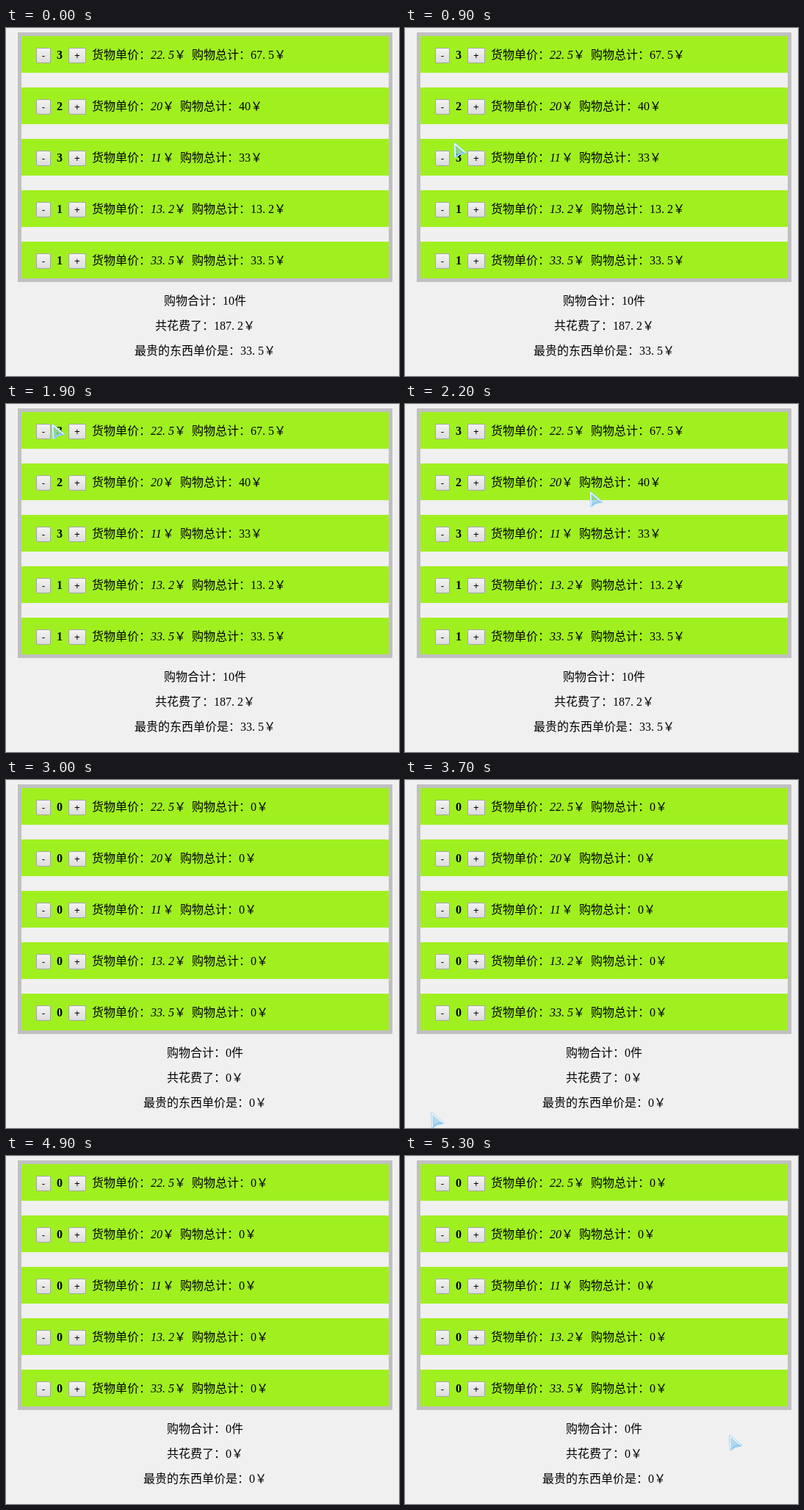
An HTML page for the animation above (8400 ms loop, 535x474 px).

```html
<!DOCTYPE html>
<html lang="zh-CN">
<head>
<meta charset="UTF-8">
<title>购物清单</title>
<style>
  html, body { margin: 0; width: 100%; height: 100%; overflow: hidden; background: #f0f0f0; }
  svg { display: block; }
  text { white-space: pre; }
  .shop { font: 300 16px "Liberation Serif", "Noto Sans CJK SC", "Noto Sans CJK", serif; }
  .dot { letter-spacing: 4px; }
  .price { font-style: italic; }
  .count { font-weight: bold; }
  .key { font: 13.33px "Liberation Sans", sans-serif; }
  .tab { font: 12px "Open Sans", sans-serif; }
  .code { font: 13.3px "DejaVu Sans Mono", "Noto Sans CJK SC", "Noto Sans CJK", monospace; fill: #fff; }
  .han { font: 15px "Noto Sans CJK SC", "Noto Sans CJK", sans-serif; }
  .p { fill: #f92672; }
  .g { fill: #a6e22e; }
  .y { fill: #e6db74; }
  .o { fill: #fd971f; }
  .c { fill: #66d9ef; }
  .i { fill: #66d9ef; font-style: italic; }
  .v { fill: #ae81ff; }
</style>
</head>
<body>
<svg id="stage" width="535" height="474" viewBox="0 0 535 474">
  <defs>
    <linearGradient id="face" x2="0" y2="1">
      <stop offset="0" stop-color="#f3f3f3"/>
      <stop offset="1" stop-color="#dcdcdc"/>
    </linearGradient>
    <linearGradient id="glass" x2="1" y2="1">
      <stop offset="0" stop-color="#74bce0" stop-opacity=".45"/>
      <stop offset="1" stop-color="#8cccf4" stop-opacity=".6"/>
    </linearGradient>
  </defs>
</svg>
<script>
const LOOP = 8400;
const prices = [22.5, 20, 11, 13.2, 33.5];

// start time, then the pointer's corner; no corner means hidden
const pointerSteps = [
  [0], [100, 153, 235], [700, 91, 186],
  [900, 66, 156], [1000, 28, 112], [1100, 1, 80],
  [1400, 24, 52], [1500, 57, 27], [1600, 40, 14], [1700, 26, 11],
  [1900, 62, 27], [2000, 136, 62], [2100, 212, 100], [2200, 251, 119],
  [3000], [3700, 35, 453], [4000], [5300, 441, 380]
];
const sceneSteps = [[0, 'full'], [3000, 'empty'], [4000, 'editor'], [4900, 'empty']];

const rect = (x, y, w, h, fill, more = '') =>
  `<rect x="${x}" y="${y}" width="${w}" height="${h}" fill="${fill}" ${more}/>`;
const label = (x, y, str, cls = '') => `<text x="${x}" y="${y}" class="${cls}">${str}</text>`;
const line = (d, color, more = '') => `<path d="${d}" fill="none" stroke="${color}" ${more}/>`;

// half-width characters take 8px, full-width ones 16px
const widthOf = str => [...str].reduce((w, ch) => w + (ch < '\u0100' ? 8 : 16), 0);
const shopText = (x, y, str, cls) =>
  label(x, y, str.replace('.', '<tspan class="dot">.</tspan>'), cls);
const money = n => String(+n.toFixed(1));

function button(x, y, w, sign) {
  return rect(x + .5, y + .5, w - 1, 20, 'url(#face)', 'stroke="#a4a4a4" rx="1.5"') +
    `<text x="${x + w / 2}" y="${y + 15}" text-anchor="middle" class="key">${sign}</text>`;
}

function shopRow(price, count, top) {
  const base = top + 31, tag = money(price);
  const yen = 197 + widthOf(tag), total = yen + 24;
  return rect(21, top, 500, 50, '#a0f020') +
    button(41, top + 16, 20, '-') + button(85, top + 16, 24, '+') +
    shopText(69, base, String(count), 'count') +
    shopText(117, base, '货物单价：') + shopText(197, base, tag, 'price') +
    shopText(yen, base, '￥') +
    shopText(total, base, `购物总计：${money(price * count)}￥`);
}

function shop(counts) {
  const items = counts.reduce((a, b) => a + b);
  const cost = counts.reduce((sum, n, k) => sum + n * prices[k], 0);
  const top = Math.max(...counts.map((n, k) => n ? prices[k] : 0));
  const notes = [`购物合计：${items}件`, `共花费了：${money(cost)}￥`, `最贵的东西单价是：${money(top)}￥`];
  return rect(0, 0, 535, 474, '#f0f0f0') +
    rect(18.5, 8.5, 505, 335, 'none', 'stroke="#c0c0c0" stroke-width="5"') +
    prices.map((p, k) => shopRow(p, counts[k], 11 + 70 * k)).join('') +
    notes.map((s, k) => shopText(271 - widthOf(s) / 2, 377 + 34 * k, s)).join('');
}

// "p:word" colours a word; plain strings keep the default colour
const paint = parts => parts.map(s => {
  const m = /^([pgyociv]):(.*)$/.exec(s);
  const safe = (m ? m[2] : s).replace(/</g, '&lt;').replace(/>/g, '&gt;');
  return m ? `<tspan class="${m[1]}">${safe}</tspan>` : safe;
}).join('');
const rule = (name, ...value) => ['i:' + name, ': ', ...value, ';'];
const px = n => ['v:' + n, 'p:px'];

// row number, left edge, parts
const code = [
  [0, -84, ['<!', 'p:DOCTYPE', ' html>']],
  [3, -20, ['<', 'p:meta', ' ', 'g:charset', '=', 'y:"UTF-8"', '>']],
  [4, -20, ['<', 'p:title', '>Go']],
  [4, 172, ['</', 'p:title', '>']],
  [5, -20, ['<', 'p:style', ' ', 'g:type', '=', 'y:"text/css"', '>']],
  [6, 12, ['p:ul', 'o:{']],
  [7, 44, rule('margin', 'v:0')],
  [8, 44, rule('padding', 'v:0')],
  [9, 12, ['o:}']],
  [10, 12, ['g:#list', 'o:{']],
  [11, 44, rule('width', ...px(500))],
  [12, 44, rule('border', ...px(5), ' ', 'c:solid', ' ', 'v:#ccc')],
  [13, 44, rule('margin', 'v:0', ' ', 'c:auto')],
  [14, 12, ['o:}']],
  [15, 12, ['p:li', 'o:{']],
  [16, 44, rule('list-style', 'c:none')],
  [17, 44, rule('height', ...px(50))],
  [18, 44, rule('margin-top', ...px(20))],
  [19, 44, rule('line-height', ...px(50))],
  [20, 44, rule('padding-left', ...px(20))],
  [21, 44, rule('background', 'greenyellow')],
  [22, 12, ['o:}']]
];

function fileIcon(x, paper, ink) {
  return `<path d="M${x} 15.5h6l3 3v9h-9z" fill="${paper}" stroke="${ink}"/>` +
    line(`M${x + 4} 19.5l-2 2.5 2 2.5M${x + 5.5} 19.5l2 2.5-2 2.5`, ink);
}

function editor() {
  const marks = [91, 168, 279, 373].map(x => rect(x, 1, 1, 4, '#b0b0b0')).join('');
  const guides = line('M13.5 169V208M13.5 245V303M13.5 340V455', '#555', 'stroke-dasharray="1 1"');
  return rect(0, 0, 535, 474, '#202020') +
    rect(0, 0, 535, 33, '#f0f0f0') + marks +
    line('M434.5 0V3.5H535', '#b4b4b4') + line('M0 9.5H535', '#d4d4d4') +
    `<path d="M75 34V11q0-2 2-2H182q2 0 2 2V34z" fill="#202020"/>` +
    fileIcon(-4.5, '#fff', '#7048b0') + fileIcon(81.5, '#202020', '#4c94d8') +
    label(11, 26, 'case.js', 'tab') +
    `<g fill="#fff">${label(98, 26, 'index.html', 'tab')}</g>` +
    line('M167 17l8 8M175 17l-8 8', '#fff', 'stroke-width="2.2"') +
    rect(0, 34, 535, 20, '#404030') +
    rect(28.5, 37.5, 7, 16, 'none', 'stroke="#8c8c7c"') +
    guides +
    `<g class="code">` +
    code.map(([row, x, parts]) => label(x, 50 + 19 * row, paint(parts))).join('') +
    label(52, 126, '、购物去了！！！', 'han') + `</g>`;
}

const arrow = 'M1.5 1.5L16.5 14L8.5 15.5L2.5 20Z';
const pointer = `<g id="pointer" stroke-linejoin="round">
  <path d="${arrow}" fill="none" stroke="#78bfec" stroke-width="2.8"/>
  <path d="${arrow}" fill="url(#glass)" stroke="#eaf8ff" stroke-width="1.7"/>
  <path d="M3 19.5L8.5 15.2L16 14" fill="none" stroke="#6cb6ea" stroke-width="1.1"/>
</g>`;

const scenes = { full: shop([3, 2, 3, 1, 1]), empty: shop([0, 0, 0, 0, 0]), editor: editor() };
const stage = document.getElementById('stage');
stage.insertAdjacentHTML('beforeend',
  Object.entries(scenes).map(([id, art]) => `<g id="${id}" class="shop">${art}</g>`).join('') + pointer);

const show = (id, on) => {
  const el = document.getElementById(id);
  el.style.display = on ? '' : 'none';
  return el;
};
const stepAt = (steps, t) => steps.filter(s => s[0] <= t).pop();

const start = performance.now();
function draw() {
  const t = Math.max(0, performance.now() - start) % LOOP;
  const scene = stepAt(sceneSteps, t)[1];
  for (const id in scenes) show(id, id === scene);
  const [, x, y] = stepAt(pointerSteps, t);
  const el = show('pointer', x !== undefined);
  if (x !== undefined) el.setAttribute('transform', `translate(${x} ${y})`);
  requestAnimationFrame(draw);
}
draw();
</script>
</body>
</html>
```
